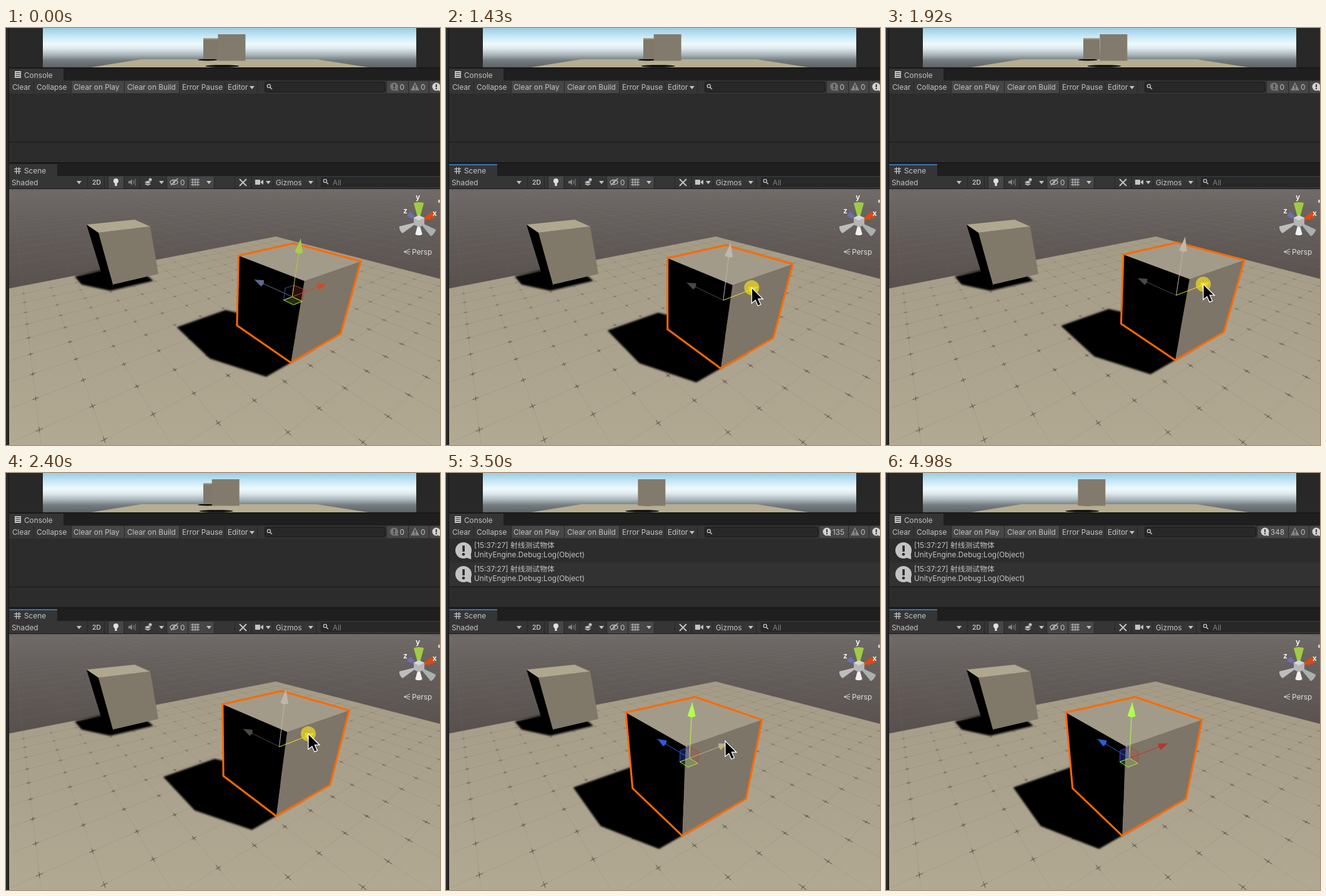
An HTML page with a canvas that plays this animation: 695 by 668 pixels, repeating every 5120 ms.

```html
<!DOCTYPE html>
<html lang="en">
<head>
<meta charset="utf-8">
<title>Editor scene</title>
<style>
html, body { margin: 0; width: 100%; height: 100%; overflow: hidden; background: #1f1f1f; }
canvas { display: block; }
</style>
</head>
<body>
<canvas id="stage" width="695" height="668"></canvas>
<script>
const ctx = document.getElementById('stage').getContext('2d');
const LOOP = 5120, PRESS = 1290, LOGGING = 2750, RELEASE = 3500, LEAVE = 4000;
const UI = 'Inter, "Noto Sans CJK SC", "Noto Sans CJK", sans-serif';
const LIGHT = '#c4c4c4', BAR = '#353535', PANEL = '#2c2c2c', EDGE = '#191919';

// ---- drawing helpers ----
function rect(x, y, w, h, color) { ctx.fillStyle = color; ctx.fillRect(x, y, w, h); }
function trace(points, closed = true) {
  ctx.beginPath();
  points.forEach(([x, y]) => ctx.lineTo(x, y));
  if (closed) ctx.closePath();
}
function poly(points, fill, stroke, width = 1) {
  trace(points);
  if (fill) { ctx.fillStyle = fill; ctx.fill(); }
  if (stroke) { ctx.strokeStyle = stroke; ctx.lineWidth = width; ctx.stroke(); }
}
function line(points, color, width = 1) {
  trace(points, false);
  ctx.strokeStyle = color; ctx.lineWidth = width; ctx.stroke();
}
function oval(x, y, rx, ry, fill, stroke) {
  ctx.beginPath(); ctx.ellipse(x, y, rx, ry, 0, 0, 7);
  if (fill) { ctx.fillStyle = fill; ctx.fill(); }
  if (stroke) { ctx.strokeStyle = stroke; ctx.lineWidth = 1.3; ctx.stroke(); }
}
function disc(x, y, r, color) { oval(x, y, r, r, color); }
function text(s, x, y, color = LIGHT, size = 11.8, weight = 400) {
  ctx.font = `${weight} ${size}px ${UI}`;
  ctx.fillStyle = color; ctx.fillText(s, x, y);
}
function gradient(y0, y1, ...stops) {
  const g = ctx.createLinearGradient(0, y0, 0, y1);
  stops.forEach(([at, color]) => g.addColorStop(at, color));
  return g;
}
function softly(radius, paint) {
  ctx.save(); ctx.filter = `blur(${radius}px)`; paint(); ctx.restore();
}
function clipped(points, paint) {
  ctx.save(); trace(points); ctx.clip(); paint(); ctx.restore();
}
function separators(y, ...xs) { xs.forEach(x => rect(x, y, 1, 19, '#262626')); }
function dropArrow(x, y) { poly([[x - 4, y - 2], [x + 4, y - 2], [x, y + 3]], LIGHT); }
function lens(x, y) {
  oval(x, y, 2.6, 2.6, null, LIGHT); line([[x + 2, y + 2], [x + 5, y + 5]], LIGHT, 1.5);
}
function cone(tip, from, size, half, color) {
  const dx = tip[0] - from[0], dy = tip[1] - from[1], len = Math.hypot(dx, dy);
  const ux = dx / len, uy = dy / len, bx = tip[0] - ux * size, by = tip[1] - uy * size;
  poly([tip, [bx - uy * half, by + ux * half], [bx - ux * 2, by - uy * 2], [bx + uy * half, by - ux * half]], color);
}

// ---- motion ----
function ease(t, from, to) {
  const p = Math.max(0, Math.min(1, (t - from) / (to - from)));
  return 1 - (1 - p) ** 1.4;
}
// The picture advances every 70 ms, counted anew from each burst of activity.
function stepped(t) {
  const start = [0, 70, PRESS, 2260, LEAVE].filter(s => s <= t).pop();
  return start + Math.floor((t - start) / 70) * 70;
}
// Cube travel along its x axis, in cube widths: a short wiggle, then a long pull.
function travel(t) {
  return -.24 * ease(t, 1240, 1570) + .35 * ease(t, 1570, 1780)
    - .034 * ease(t, 1780, 1920) - .803 * ease(t, 2190, 2890);
}
function pointerAt(t) {
  if (t >= LEAVE) {
    const u = ease(t, LEAVE - 50, 4490), v = 1 - u;
    const curve = (a, b, c) => v * v * a + 2 * u * v * b + u * u * c;
    return [curve(447, 780, 636), curve(430, 300, 104) - 60 * ease(t, 4700, 4910)];
  }
  const away = 1 - ease(t, 70, 540), d = travel(t);
  return [502.3 + 76 * d + 132 * away, 412 - 23.7 * d + 221 * away];
}
// The console repaints slowly while the pointer rests.
function logCount(t) {
  const idle = t > 2900 && t < LEAVE;
  const at = idle ? Math.floor((t - 100) / 200) * 200 + 100 : stepped(t);
  if (at < RELEASE) return Math.max(0, Math.round((at - 2765) * .1837));
  return Math.round(348 - .144 * Math.max(0, 4980 - at));
}

// ---- perspective: the cube's front bottom corner and three vanishing points ----
const CORNER = [456, 536], VX = [998, 224], VY = [355, 1140], VZ = [5, 224];
const HOVER = .33;              // height of the cube above the floor
const FLOOR_FAR = [5.52, 5.56]; // far corner of the floor
const GRID = [.5, .54];
function depth(x, y, z) { return 1 + .173 * x - .178 * y + .236 * z; }
function project(x, y, z) {
  const w = depth(x, y, z);
  return [0, 1].map(k => (CORNER[k] + .173 * x * VX[k] - .178 * y * VY[k] + .236 * z * VZ[k]) / w);
}
function ground(x, z) { return project(x, -HOVER, z); }

// ---- panels ----
function gameView(d) {
  rect(0, 0, 695, 64, '#282828');
  rect(59, 0, 598, 63, gradient(0, 63, [0, '#9bcbe3'], [.22, '#c9e9f5'], [.4, '#eefafc'],
    [.52, '#dfeaee'], [.68, '#aab6bb'], [.82, '#737c80'], [1, '#5f6365']));
  poly([[217, 50], [497, 50], [580, 63], [136, 63]], '#b6ad92');
  const [pivot] = project(.5 + d, .5, .5), x = 343 + (pivot - 466) * .4675;
  softly(.6, () => {
    oval(323, 51, 16, 1.5, '#080808');
    oval(x + 7, 61, 27, 1.8, '#080808');
    rect(316, 17, 26, 33, '#7f786b');
    rect(316, 16, 26, 2, '#aaa18c');
  });
  rect(x, 10, 44, 42.5, '#827a6c');
  rect(0, 63, 695, 2, '#181818');
}

function bubble(x, y, r, color) {
  disc(x, y, r, color);
  poly([[x + r * .1, y + r * .8], [x + r * .9, y + r * .2], [x + r * .95, y + r * 1.1]], color);
  rect(x - r * .13, y - r * .6, r * .28, r * .75, PANEL);
  disc(x, y + r * .48, r * .18, PANEL);
}

function consolePanel(count, logging) {
  rect(0, 65, 695, 20, '#1f1f1f');
  rect(5, 65, 87, 20, BAR);
  rect(14, 69, 10, 11, LIGHT);
  for (const y of [71, 74, 77]) rect(15.5, y, 7, 1, BAR);
  text('Console', 29, 80);
  rect(5, 84, 690, 21, BAR);
  rect(105, 85, 84, 19, '#464646');
  rect(190, 85, 87, 19, '#464646');
  separators(85, 44, 104, 189, 277, 350, 402);
  [['Clear', 10], ['Collapse', 49], ['Clear on Play', 108], ['Clear on Build', 194], ['Error Pause', 282], ['Editor', 355]]
    .forEach(([s, x]) => text(s, x, 99));
  dropArrow(394, 95);
  const labelX = 638 - ctx.measureText(count).width;
  ctx.beginPath();
  ctx.roundRect(414.5, 86.5, labelX - 438, 16, 3);
  ctx.fillStyle = '#282828'; ctx.fill();
  ctx.strokeStyle = EDGE; ctx.lineWidth = 1; ctx.stroke();
  lens(421, 93);
  rect(labelX - 21, 85, 716 - labelX, 19, '#464646');
  separators(85, labelX - 22, 644, 677);
  bubble(labelX - 9, 94, 6.5, logging ? '#d2d2d2' : '#777');
  text(String(count), labelX, 99);
  poly([[655, 87], [662, 100], [648, 100]], '#858585');
  rect(654.3, 91, 1.5, 5, BAR); rect(654.3, 97, 1.5, 1.5, BAR);
  text('0', 664, 99);
  bubble(689, 94, 6.5, '#d2d2d2');

  rect(5, 105, 690, 112, PANEL);
  if (logging) {
    rect(5, 143, 690, 38, '#323232');
    for (const y of [105, 143]) {
      bubble(28, y + 19, 13, LIGHT);
      text('[15:37:27] 射线测试物体', 45, y + 15);
      text('UnityEngine.Debug:Log(Object)', 45, y + 30);
    }
  }
  rect(5, 182, 690, 1, EDGE);
  rect(5, 215, 690, 2, EDGE);
}

function sceneBar(focused) {
  rect(0, 217, 695, 20, '#1f1f1f');
  rect(5, 218, 77, 20, BAR);
  if (focused) rect(5, 218, 77, 2, '#3a72b0');
  for (const d of [16, 20]) {
    rect(d, 223, 1.3, 11, LIGHT);
    rect(13, d + 209, 11, 1.3, LIGHT);
  }
  text('Scene', 29, 233);
  rect(5, 237, 690, 20, BAR);
  rect(164, 238, 24, 19, '#464646');
  rect(258, 238, 75, 19, '#464646');
  separators(238, 130, 157, 163, 189, 214, 257, 291, 333, 366, 393, 427, 496);
  text('Shaded', 9, 252);
  for (const x of [117, 249, 325, 420, 488]) dropArrow(x, 247);
  text('2D', 138, 251, LIGHT, 10.5, 600);
  disc(176, 245, 4, '#e0e0e0'); rect(174.3, 248, 3.4, 5, '#e0e0e0');
  rect(196, 245, 3, 4, '#858585'); poly([[198, 246], [202, 242], [202, 252], [198, 248]], '#858585');
  for (const d of [0, 2.5]) line([[204.5 + d, 244 - d], [204.5 + d, 250 + d]], '#858585');
  for (const y of [250, 247]) poly([[221, y], [227, y - 3], [233, y], [227, y + 3]], LIGHT, BAR);
  disc(231, 243, 2.5, LIGHT);
  oval(269, 247, 6, 3.5, null, LIGHT);
  disc(269, 247, 1.8, LIGHT); line([[264, 252], [275, 241]], LIGHT, 1.3);
  text('0', 279, 252);
  for (const d of [0, 4, 8]) {
    line([[299 + d, 241], [299 + d, 253]], LIGHT);
    line([[296, 243 + d], [310, 243 + d]], LIGHT);
  }
  line([[374, 242], [385, 253]], LIGHT, 2); line([[385, 242], [374, 253]], LIGHT, 2);
  rect(399, 243, 8, 8, LIGHT); poly([[407, 247], [412, 243], [412, 251]], LIGHT);
  text('Gizmos', 432, 252);
  rect(504, 239, 191, 16, '#282828');
  lens(511, 245);
  text('All', 523, 252, '#808080');
  rect(5, 257, 690, 1, EDGE);
}

// ---- 3D scene ----
function gridLines(step, reach, color) {
  const visible = points => points.filter(([x, z]) => depth(x, -HOVER, z) > .25).map(p => ground(...p));
  for (let k = -reach; k <= reach; k += step) {
    const ends = Array.from({ length: 2 * reach + 1 }, (_, i) => i - reach);
    line(visible(ends.map(j => [j, k + GRID[1]])), color);
    line(visible(ends.map(j => [k + GRID[0], j])), color);
  }
}

function crosses() {
  for (let i = -9; i <= 9; i++) for (let j = -9; j <= 9; j++) {
    const x = GRID[0] + i / 2, z = GRID[1] + j / 2;
    if (depth(x, -HOVER, z) < .4) continue;
    const shade = `rgba(50,44,38,${Math.max(0, Math.min(.4, (ground(x, z)[1] - 350) / 500))})`;
    line([ground(x - .03, z), ground(x + .03, z)], shade, 1.6);
    line([ground(x, z - .04), ground(x, z + .04)], shade, 1.6);
  }
}

function terrain() {
  rect(5, 258, 690, 410, gradient(258, 420, [0, '#6c6664'], [1, '#57504d']));
  gridLines(1, 36, 'rgba(165,160,158,.08)');
  const floor = [[-20, 422], ground(...FLOOR_FAR), ground(FLOOR_FAR[0], -1), [720, 700], [-20, 700]];
  clipped(floor, () => {
    rect(5, 320, 690, 348, gradient(334, 668, [0, '#a59c88'], [.5, '#aba28d'], [1, '#b2a993']));
    gridLines(.5, 10, 'rgba(90,82,70,.12)');
    crosses();
  });
}

function farCube() {
  softly(1.4, () => poly([[110, 398], [121, 411], [167, 421], [236, 405], [225, 396], [152, 388]], '#000'));
  const left = [129, 315], right = [231, 318], near = [148, 328], low = [171, 411];
  poly([left, [206, 307], right, near], '#b0a78f');
  poly([near, right, [244, 394], low], '#807869');
  poly([left, near, low, [152, 390]], '#000');
}

function nearCube(d) {
  const at = (x, y, z) => project(x + d, y, z);
  const cast = (x, z, height) => ground(x + d - .38 * height, z + .72 * height);
  const top = 1 + HOVER;
  softly(1.4, () => poly([cast(0, 0, HOVER), cast(0, 0, top), cast(0, 1, top),
    cast(1, 1, top), cast(1, 1, HOVER), cast(1, 0, HOVER)], '#000'));
  const left = at(0, 1, 1), back = at(1, 1, 1), right = at(1, 1, 0), inner = at(0, 1, 0);
  const low = at(0, 0, 0), lowRight = at(1, 0, 0), lowLeft = at(0, 0, 1);
  poly([left, back, right, inner], '#a39b89');
  poly([inner, right, lowRight, low], '#7d7568');
  poly([left, inner, low, lowLeft], '#000');
  ctx.lineJoin = 'round';
  poly([left, back, right, lowRight, low, lowLeft], null, '#ff6a00', 3);
  ctx.lineJoin = 'miter';
}

function handles(d, pressed, hovered, focused) {
  let [cx, cy, cz] = focused ? ['#b8382a', '#b2ff4e', '#2f5cd6'] : ['#c94e26', '#a9cb50', '#616a8f'];
  if (hovered) cx = '#b9b57e';
  if (pressed) [cx, cy, cz] = ['#f0e428', '#bdb8ab', '#4b4843'];
  const size = .65 * depth(.5 + d, .5, .5);
  const at = (x, y, z) => project(.5 + d + x * size, .5 + y * size, .5 + z * size);
  const o = at(0, 0, 0), tipX = at(1, 0, 0), tipY = at(0, 1, 0), tipZ = at(0, 0, 1), s = .22;
  if (!pressed) {
    poly([o, at(-s, 0, 0), at(-s, s, 0), at(0, s, 0)], focused ? 'rgba(70,90,220,.3)' : null, focused ? '#2c46c8' : '#4a4f86');
    poly([o, at(0, 0, -s), at(0, s, -s), at(0, s, 0)], 'rgba(190,70,50,.22)', focused ? 'rgba(170,60,45,.6)' : '#b3402a');
    poly([o, at(-s, 0, 0), at(-s, 0, -s), at(0, 0, -s)], 'rgba(150,220,70,.22)', '#b0ec48');
  }
  line([o, tipZ], cz); line([o, tipX], cx); line([o, tipY], cy);
  cone(tipZ, o, 14, 5.5, cz);
  cone(tipX, o, 14, 5.5, cx);
  cone(tipY, o, 22, 6.5, cy);
}

function compass() {
  const x = 661, y = 310;
  const arm = (degrees, length, half, color) => {
    ctx.save(); ctx.translate(x, y); ctx.rotate(degrees * Math.PI / 180);
    poly([[0, 0], [length, -half], [length, half]], color);
    oval(length, 0, 2, half, color);
    ctx.restore();
  };
  arm(-90, 29, 8, '#9ecb45');
  arm(-25, 25, 5, '#e2480f');
  arm(-142, 19, 4.5, '#6b70a6');
  arm(155, 31, 6, '#bdbdbd');
  arm(38, 29, 6.5, '#a9b0ae');
  arm(90, 20, 5.5, '#f0f0f0');
  poly([[x - 8, y - 6], [x, y - 10], [x + 9, y - 6], [x + 9, y + 5], [x, y + 9], [x - 8, y + 5]], '#b5b5b5');
  poly([[x - 8, y - 6], [x, y - 10], [x + 9, y - 6], [x, y - 2]], '#d7d7d7');
  text('y', 656, 275, '#fff', 12, 600);
  text('x', 683, 301, '#fff', 12, 600);
  text('z', 636, 297, '#fff', 12, 600);
  for (const dy of [-4.5, 0, 4.5]) line([[637, 358.5], [647, 358.5 + dy]], '#d0d0d0');
  text('Persp', 650, 363, '#dcdcdc');
  rect(692, 275, 3, 5, '#c8c8c8');
}

function pointer([x, y], pressed) {
  if (pressed) disc(x, y, 12, 'rgba(235,215,35,.75)');
  const shape = [[0, 0], [0, 25], [6, 20], [10, 29], [14.5, 27], [10.5, 18], [18, 18]];
  poly(shape.map(([dx, dy]) => [x + dx, y + dy]), '#000', '#fff', 1.3);
}

function draw(t) {
  const time = stepped(t), d = travel(time);
  const focused = t >= PRESS, pressed = focused && t < RELEASE;
  const hovered = (t >= 480 && t < PRESS) || (t >= RELEASE && t < LEAVE);
  rect(0, 0, 695, 668, '#1f1f1f');
  gameView(d);
  consolePanel(logCount(t), t >= LOGGING);
  sceneBar(focused);
  clipped([[5, 258], [695, 258], [695, 668], [5, 668]], () => {
    terrain();
    farCube();
    nearCube(d);
    handles(d, pressed, hovered, focused);
    compass();
  });
  rect(0, 0, 4, 668, '#282828');
  rect(4, 0, 1, 668, '#141414');
  if (t >= 70 && t < 4980) pointer(pointerAt(time), pressed);
}

function loop() {
  draw(performance.now() % LOOP);
  requestAnimationFrame(loop);
}
loop();
</script>
</body>
</html>
```
